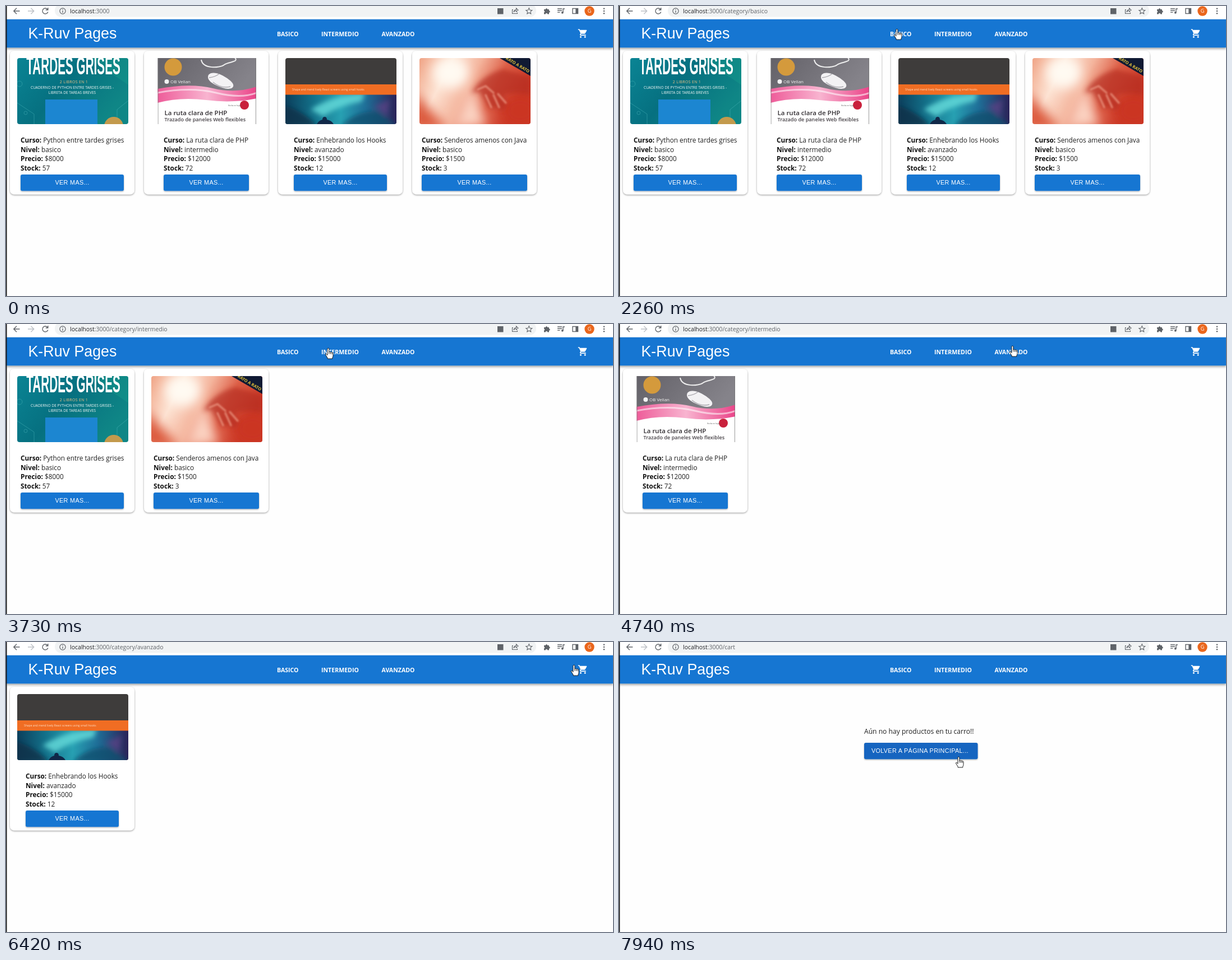
Animation, 1082 px wide and 518 px high, one loop 8000 ms. Source, as an HTML page:

```html
<!DOCTYPE html>
<html lang="es">
<head>
<meta charset="utf-8">
<title>Tienda de cursos</title>
<style>
  html, body { margin: 0; width: 100%; height: 100%; overflow: hidden; background: #fefefe; }
  svg { display: block; width: 100%; height: 100%; }
  text { font-family: "Open Sans", "Noto Sans", sans-serif; white-space: pre; }
  .arial { font-family: "Liberation Sans", Arial, sans-serif; }
  .nav { font-size: 10.6px; font-weight: 700; fill: #fff; }
  .info { font-size: 11.8px; fill: #212121; }
  .info .key { font-weight: 700; fill: #111; }
  .btn { font-size: 10.85px; letter-spacing: .31px; fill: #fff; }
  .url { font-size: 10.45px; fill: #5f6368; }
  .icon { fill: none; stroke: #5f6368; stroke-width: 1.4; }
</style>
</head>
<body>
<svg viewBox="0 0 1082 518" xmlns="http://www.w3.org/2000/svg">
  <defs>
    <filter id="lift" x="-10%" y="-10%" width="120%" height="125%">
      <feDropShadow dx="0" dy="1.3" stdDeviation="1.4" flood-opacity=".4"/>
    </filter>
    <filter id="btnLift" x="-5%" y="-20%" width="110%" height="150%">
      <feDropShadow dx="0" dy="1.2" stdDeviation=".9" flood-opacity=".34"/>
    </filter>
    <filter id="barLift" x="-2%" y="-10%" width="104%" height="140%">
      <feDropShadow dx="0" dy="2" stdDeviation="2" flood-opacity=".42"/>
    </filter>
    <filter id="crisp" x="-40%" y="-40%" width="180%" height="180%"><feGaussianBlur stdDeviation="1.8"/></filter>
    <filter id="soft" x="-40%" y="-40%" width="180%" height="180%"><feGaussianBlur stdDeviation="4.5"/></filter>
    <filter id="softer" x="-60%" y="-60%" width="220%" height="220%"><feGaussianBlur stdDeviation="10"/></filter>
    <clipPath id="frame"><rect width="198" height="118" rx="4"/></clipPath>
    <clipPath id="sheet"><rect x="11.5" width="175.5" height="118"/></clipPath>
    <linearGradient id="teal" x2="1" y2=".5">
      <stop stop-color="#0a8494"/><stop offset=".5" stop-color="#067080"/><stop offset="1" stop-color="#0f8686"/>
    </linearGradient>
    <linearGradient id="grey" x2="1" y2=".3">
      <stop stop-color="#636168"/><stop offset="1" stop-color="#85838a"/>
    </linearGradient>
    <linearGradient id="pink" x2="1">
      <stop stop-color="#ee5c99"/><stop offset=".5" stop-color="#f8b4d0"/><stop offset="1" stop-color="#ea4388"/>
    </linearGradient>
    <linearGradient id="sky" x2="1">
      <stop stop-color="#0b3f5c"/><stop offset=".25" stop-color="#137089"/><stop offset=".5" stop-color="#27a0b2"/>
      <stop offset=".72" stop-color="#1f6f98"/><stop offset="1" stop-color="#2b2358"/>
    </linearGradient>
    <linearGradient id="warm" x2="1" y2=".3">
      <stop stop-color="#f0a486"/><stop offset=".28" stop-color="#fde3d3"/>
      <stop offset=".52" stop-color="#f4b49c"/><stop offset=".75" stop-color="#dd5f47"/><stop offset="1" stop-color="#cb3826"/>
    </linearGradient>

    <g id="coverPython" clip-path="url(#frame)">
      <rect width="198" height="118" fill="url(#teal)"/>
      <path d="M128 0H198V48Z" fill="#19a08e" opacity=".35"/>
      <g fill="none" stroke="#52b9bd" opacity=".45">
        <circle cx="4" cy="46" r="5"/><path d="M0 80L30 100V118M198 76L178 92V118"/><circle cx="15" cy="98" r="3"/>
      </g>
      <text class="arial" transform="translate(100 29) scale(.46 1)" font-size="45" font-weight="700" fill="#fff" text-anchor="middle">TARDES GRISES</text>
      <g text-anchor="middle" fill="#f2f7f5">
        <text x="101" y="45" font-size="7" fill="#ecc083" letter-spacing=".3">2 LIBROS EN 1</text>
        <text x="98" y="55" font-size="6.6">CUADERNO DE PYTHON ENTRE TARDES GRISES -</text>
        <text x="98" y="63.5" font-size="6.6">LIBRETA DE TAREAS BREVES</text>
      </g>
      <rect x="50" y="74" width="93" height="93" fill="#1c86d1"/>
      <circle cx="172" cy="122" r="17" fill="#c39a4c"/>
    </g>

    <g id="coverPhp" clip-path="url(#sheet)">
      <rect x="11" width="177" height="118" fill="#fff"/>
      <rect x="11" width="177" height="62" fill="url(#grey)"/>
      <path d="M89 3C92 20 122 18 130 12S158 8 148-2" fill="none" stroke="#eee" stroke-width="2"/>
      <path d="M102 30C108 23 124 27 139 39C154 50 144 59 127 53C112 48 97 40 102 30Z" fill="#f3f2f4"/>
      <path d="M103 35Q114 34 121 28M110 43Q124 55 141 51" fill="none" stroke="#aaa8ae" stroke-width="1.3"/>
      <path d="M11 55Q70 44 110 54T188 51V72Q145 81 98 75T11 80Z" fill="url(#pink)"/>
      <path d="M11 62Q70 51 115 62T188 62" fill="none" stroke="#fff" stroke-width="3" opacity=".55"/>
      <circle cx="39" cy="16" r="15.5" fill="#d49a3c"/>
      <circle cx="27.5" cy="42" r="4" fill="#f2f2f2"/>
      <text x="34" y="45" font-size="8" fill="#f5f5f5">OB Vellan</text>
      <circle cx="166" cy="84" r="8" fill="#c9213c"/>
      <text x="137" y="86" font-size="3.2" fill="#555">Hecho en hojas</text>
      <text x="23.5" y="102" font-size="11.5" font-weight="600" fill="#302c30">La ruta clara de PHP</text>
      <text x="23.5" y="113" font-size="9.1" font-weight="600" fill="#464146">Trazado de paneles Web flexibles</text>
      <path d="M12 0V118M186.5 0V118" stroke="#777" stroke-width="1.3" opacity=".65"/>
    </g>

    <g id="coverHooks" clip-path="url(#frame)">
      <rect width="198" height="118" fill="#3e3c3b"/>
      <rect y="65" width="198" height="53" fill="url(#sky)"/>
      <g filter="url(#soft)">
        <path d="M-5 84Q30 92 58 122H-5Z" fill="#0a2f49" opacity=".8"/>
        <path d="M45 92Q85 66 142 62L136 78Q96 84 68 104Z" fill="#62d8d8" opacity=".85"/>
        <path d="M98 122Q128 92 165 96L200 122Z" fill="#15506f" opacity=".8"/>
        <path d="M158 86L186 74L182 104Z" fill="#6d3f8b" opacity=".55"/>
      </g>
      <path d="M56 118Q60 111 66 110Q66 105 70 105Q74 105 74 110Q82 111 86 118Z" fill="#102848"/>
      <rect y="47" width="198" height="18.5" fill="#f06d23"/>
      <text x="12" y="58" font-size="5" fill="#ffe1c9">Shape and mend lively React screens using small hooks</text>
    </g>

    <g id="coverJava" clip-path="url(#frame)">
      <rect width="198" height="118" fill="url(#warm)"/>
      <g filter="url(#softer)">
        <ellipse cx="56" cy="26" rx="32" ry="28" fill="#fffaf2"/>
        <path d="M-10 60L52 130H-20Z" fill="#dc5a3e"/>
        <ellipse cx="180" cy="94" rx="34" ry="30" fill="#cb3524"/>
        <path d="M62 122L92 50L120 122Z" fill="#fbd3c2"/>
      </g>
      <path d="M198 34L150 20Q124 26 104 46L92 62L106 60L116 76L126 92L134 88L148 94L156 84L150 66Q174 60 198 66Z" fill="#b62f23" opacity=".7" filter="url(#soft)"/>
      <path d="M104 56L118 50L132 62M118 66L128 88M132 66L142 88M140 64L154 80" fill="none" stroke="#f3a58f" stroke-width="3.5" stroke-linecap="round" opacity=".65" filter="url(#crisp)"/>
      <path d="M143 0H198V32Z" fill="#101a33"/>
      <text transform="translate(175 12) rotate(31)" y="2.5" font-size="7.4" font-weight="700" fill="#e4c43d" text-anchor="middle">RATO A RATO</text>
    </g>
  </defs>

  <rect width="1082" height="518" fill="#fefefe"/>
  <g id="cards"></g>
  <g id="cart">
    <text class="info" x="437" y="164" style="font-size:12.1px">Aún no hay productos en tu carro!!</text>
    <rect id="back" x="437" y="180" width="202.5" height="29.3" rx="3" filter="url(#btnLift)"/>
    <text class="btn arial" x="450" y="198">VOLVER A PÁGINA PRINCIPAL...</text>
  </g>

  <rect y="23.5" width="1082" height="50.7" fill="#1976d2" filter="url(#barLift)"/>
  <text class="arial" x="39.5" y="57.5" font-size="26.8" fill="#fff">K-Ruv Pages</text>
  <text class="nav" x="483" y="54">BASICO</text>
  <text class="nav" x="562" y="54">INTERMEDIO</text>
  <text class="nav" x="669.5" y="54">AVANZADO</text>
  <circle id="ripple" cx="1029" cy="49" r="15" fill="#0b3f7d"/>
  <path transform="translate(1019 39.7) scale(.775)" fill="#fff" d="M7 18c-1.1 0-1.99.9-1.99 2S5.9 22 7 22s2-.9 2-2-.9-2-2-2zM1 2v2h2l3.6 7.59-1.35 2.45c-.16.28-.25.61-.25.96 0 1.1.9 2 2 2h12v-2H7.42c-.14 0-.25-.11-.25-.25l.03-.12.9-1.63h7.45c.75 0 1.41-.41 1.75-1.03l3.58-6.49c.08-.14.12-.31.12-.48 0-.55-.45-1-1-1H5.21l-.94-2H1zm16 16c-1.1 0-1.99.9-1.99 2s.89 2 1.99 2 2-.9 2-2-.9-2-2-2z"/>

  <rect width="1082" height="23.5" fill="#fff"/>
  <rect x="87" y="-3" width="858" height="22.5" rx="11" fill="#f1f3f4"/>
  <g class="icon">
    <path d="M24.5 9H14M19 3.8L13.8 9L19 14.2"/>
    <path d="M39 9H49.5M44.5 3.8L49.7 9L44.5 14.2" stroke="#bdc1c6"/>
    <path d="M74 6A5 5 0 1 0 74.8 10.5M74.8 3V7H70.8"/>
    <circle cx="101" cy="9" r="5.1" stroke-width="1.2"/><path d="M101 8.3V12M101 5.8V7.1" stroke-width="1.3"/>
    <path d="M904 6.5H902.5V13.5H911.5V11.5M905 11Q905.5 6.5 909.5 6.5V4L913 7.3L909.5 10.3V8.3Q907 8 905 11Z" stroke-width="1.1"/>
    <path d="M932.3 3.6L933.9 7.2L937.8 7.6L934.9 10.2L935.7 14L932.3 12L928.9 14L929.7 10.2L926.8 7.6L930.7 7.2Z" stroke-width="1.1"/>
    <path d="M983 5H991M983 8.2H991M983 11.4H987.5M993 11.5V5H996"/>
    <rect x="1010" y="4.5" width="9.5" height="9"/>
  </g>
  <g fill="#5f6368">
    <rect x="876" y="4" width="10.5" height="10.5"/>
    <path d="M959 6H961.7A1.8 1.8 0 1 1 965.3 6H968V8.2A1.8 1.8 0 1 1 968 11.8V14.5H965.2A1.7 1.7 0 0 0 961.8 14.5H959V11.6A1.6 1.6 0 0 0 959 8.5Z"/>
    <circle cx="991.8" cy="11.8" r="1.9"/>
    <rect x="1015.3" y="4.5" width="4.5" height="9"/>
    <circle cx="1066" cy="4.7" r="1.3"/><circle cx="1066" cy="9" r="1.3"/><circle cx="1066" cy="13.3" r="1.3"/>
  </g>
  <circle cx="1040" cy="9" r="8.7" fill="#ea661c"/>
  <text x="1040" y="12.3" font-size="9" fill="#fff" text-anchor="middle">G</text>
  <text class="url" x="114" y="13"><tspan fill="#202124">localhost</tspan>:3000<tspan id="route"></tspan></text>
  <rect width="1.5" height="518" fill="#111"/>

  <g id="pointer" stroke="#111" stroke-width=".95" stroke-linejoin="round">
    <path id="arrow" fill="#fff" d="M0 0V14.2L3.3 11.2L5.6 16.2L7.8 15.2L5.5 10.4H9.8Z"/>
    <g id="hand">
      <path fill="#fff" d="M-1.6 12V1.2a1.5 1.5 0 0 1 3 0V6.5a1.5 1.4 0 0 1 2.6 .4a1.4 1.4 0 0 1 2.5 .6a1.3 1.3 0 0 1 2 1.1V13q0 2-1.2 4V18.5H-1.4V17L-4.8 11.6q-.6-1.5 .6-2q1-.3 2.6 2.4z"/>
      <path fill="none" d="M1.4 6.5V10M4 7V10.2M6.5 7.8V10.5"/>
    </g>
  </g>
</svg>
<script>
const LOOP = 8000;
const $ = id => document.getElementById(id);
const show = (el, on) => el.setAttribute('display', on ? 'inline' : 'none');
const clamp = v => Math.max(0, Math.min(1, v));

// width: size of the text column, centred in the card
const books = [
  { cover: 'Python', title: 'Python entre tardes grises', level: 'basico', price: 8000, stock: 57, width: 184 },
  { cover: 'Php', title: 'La ruta clara de PHP', level: 'intermedio', price: 12000, stock: 72, width: 152 },
  { cover: 'Hooks', title: 'Enhebrando los Hooks', level: 'avanzado', price: 15000, stock: 12, width: 166 },
  { cover: 'Java', title: 'Senderos amenos con Java', level: 'basico', price: 1500, stock: 3, width: 188 }
];

function cardMarkup(book) {
  const left = 111 - book.width / 2;
  const rows = [['Curso', book.title], ['Nivel', book.level], ['Precio', '$' + book.price], ['Stock', book.stock]];
  const lines = rows.map(([key, value], i) =>
    `<text class="info" x="${left}" y="${244 + i * 16.6}"><tspan class="key">${key}:</tspan> ${value}</text>`).join('');
  return `<g>
    <rect y="80" width="222" height="256.5" rx="8" fill="#fff" filter="url(#lift)"/>
    <use href="#cover${book.cover}" x="13" y="93"/>${lines}
    <rect x="${left}" y="301" width="${book.width}" height="29.3" rx="3" fill="#1976d2" filter="url(#btnLift)"/>
    <text class="btn arial" x="111" y="319" text-anchor="middle">VER MAS...</text></g>`;
}
$('cards').innerHTML = books.map(cardMarkup).join('');
const cards = [...$('cards').children];

// [start, value]
const routes = [[0, ''], [2120, '/category/basico'], [3670, '/category/intermedio'], [5140, '/category/avanzado'], [6750, '/cart']];
const pages = [[0, 'all'], [2650, 'basico'], [4000, 'intermedio'], [5470, 'avanzado'], [6750, 'cart']];
const current = (list, t) => list.filter(([start]) => start <= t).pop()[1];

// pointer moves: evenly timed waypoints of the hot spot
const moves = [
  { start: 660, end: 1420, steps: 12, path: [[918, 455], [785, 370], [645, 278], [543, 208], [491, 178], [488, 139]] },
  { start: 1490, end: 1850, steps: 6, path: [[490, 122], [494, 88], [496, 58], [495, 41]] },
  { start: 3180, end: 3530, steps: 6, path: [[503, 41], [540, 42], [567, 43], [574, 43]] },
  { start: 4480, end: 4950, steps: 8, path: [[590, 43], [686, 39], [707, 39], [707, 44]] },
  { start: 5870, end: 6620, steps: 10, path: [[720, 43], [800, 37], [930, 36], [1005, 40], [1026, 44], [1029, 45]] },
  { start: 6750, end: 7520, steps: 12, path: [[1029, 45], [1006, 62], [900, 120], [760, 180], [665, 206], [628, 206]] },
  { start: 7590, end: 7940, steps: 6, path: [[623, 206], [612, 206], [605, 205]] }
];

function along(path, u) {
  const pos = u * (path.length - 1);
  const i = Math.min(Math.floor(pos), path.length - 2);
  return path[i].map((v, axis) => v + (path[i + 1][axis] - v) * (pos - i));
}

function pointerAt(t) {
  const move = moves.filter(m => m.start <= t).pop();
  if (!move) return null;
  const last = move.steps - 1;
  const step = Math.floor((t - move.start) / (move.end - move.start) * last + .15);
  return along(move.path, Math.min(step, last) / last).map(Math.round);
}

// [left, top, right, bottom]
const links = [[475, 36, 529, 64], [554, 36, 637, 64], [661, 36, 738, 64], [1011, 31, 1047, 67]];
const backLink = [437, 180, 640, 209];
const inside = ([x, y], [l, t, r, b]) => x >= l && x <= r && y >= t && y <= b;

function mix(from, to, u) {
  return `rgb(${from.map((v, i) => Math.round(v + (to[i] - v) * u))})`;
}

function draw(t) {
  const page = current(pages, t);
  $('route').textContent = current(routes, t);
  let slot = 0;
  books.forEach((book, i) => {
    const on = page === 'all' || page === book.level;
    show(cards[i], on);
    if (on) cards[i].setAttribute('transform', `translate(${7 + 239 * slot++} 0)`);
  });

  show($('cart'), page === 'cart');
  $('back').setAttribute('fill', mix([25, 118, 210], [21, 101, 192], clamp((t - 7520) / 250)));
  $('ripple').setAttribute('opacity', t < 6750 ? 0 : .2 * (1 - clamp((t - 6750) / 400)));

  const spot = pointerAt(t);
  show($('pointer'), spot);
  if (!spot) return;
  const zones = page === 'cart' ? [...links, backLink] : links;
  const over = zones.some(zone => inside(spot, zone));
  show($('hand'), over);
  show($('arrow'), !over);
  $('pointer').setAttribute('transform', `translate(${spot[0] + .5} ${spot[1] + .5})`);
}

const begin = performance.now();
function tick() {
  draw((performance.now() - begin) % LOOP);
  requestAnimationFrame(tick);
}
tick();
</script>
</body>
</html>
```
